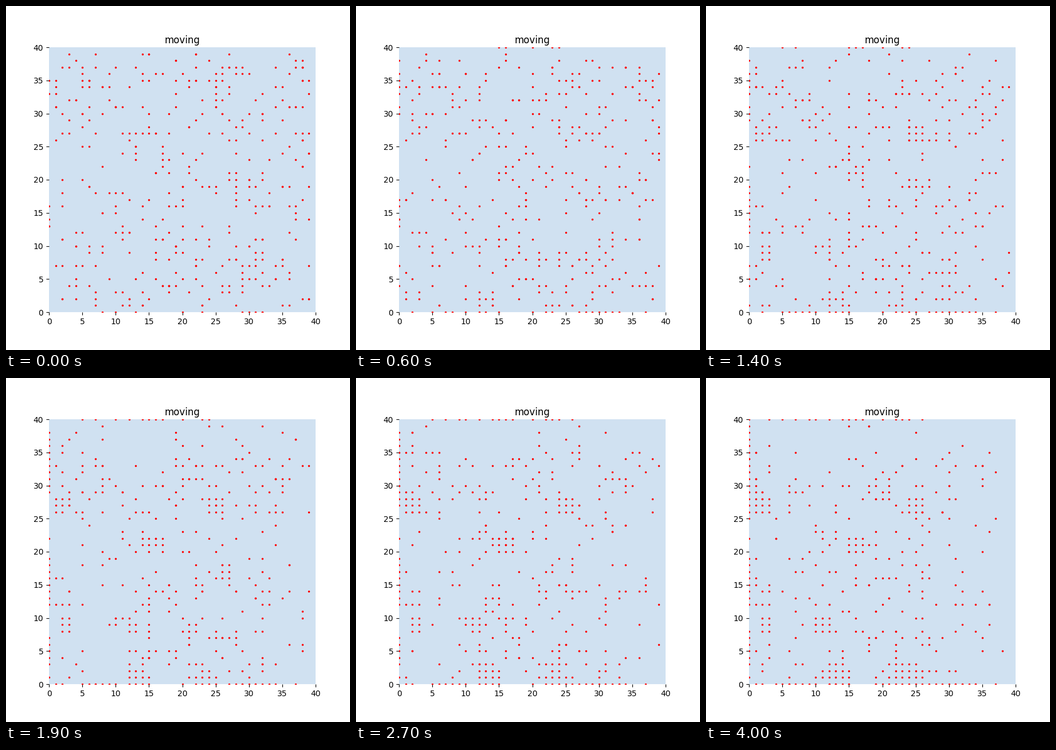
Write a matplotlib script that moves like this. It is 600 px wide and 600 px high and loops after 4100 ms.

```python
import matplotlib.pyplot as plt
import numpy as np
from matplotlib.animation import FuncAnimation

FRAMES = 41
WALKERS = 400
TOP = (39, 40)  # largest x and y a walker can reach
HUBS = np.array([(2, 9), (2, 13), (2, 27), (11, 9), (16, 21),
                 (25, 27), (13, 2), (22, 2)])
rng = np.random.default_rng(12)


def is_haven(x, y, held):
    """A walker settles at a wall, at a hub or in a crowd of settled ones."""
    at_wall = x == 0 or y in (0, TOP[1])
    at_hub = np.abs(HUBS - (x, y)).max(axis=1).min() <= 1
    return at_wall or at_hub or held[x:x + 3, y:y + 3].sum() >= 4


def settle(pos, settled, held):
    for i in np.flatnonzero(~settled):
        x, y = pos[i]
        # held has a margin of one cell on every side
        if not held[x + 1, y + 1] and is_haven(x, y, held):
            held[x + 1, y + 1] = settled[i] = True


def walk():
    pos = rng.integers(0, 40, (WALKERS, 2))
    settled = np.zeros(WALKERS, bool)
    held = np.zeros((TOP[0] + 3, TOP[1] + 3), bool)
    path = [pos]
    for _ in range(FRAMES - 1):
        settle(pos, settled, held)
        # Random steps with a slight drift to the left and down
        step = np.column_stack([
            rng.choice([-1, 0, 1], WALKERS, p=[0.38, 0.40, 0.22]),
            rng.choice([-1, 0, 1], WALKERS, p=[0.35, 0.40, 0.25])])
        step[settled] = 0
        pos = np.clip(pos + step, 0, TOP)
        path.append(pos)
    return path


path = walk()

fig, ax = plt.subplots(figsize=(6, 6), dpi=100)
ax.set_facecolor("#d0e1f1")
ax.spines[:].set_visible(False)
ax.set(xlim=(0, 40), ylim=(0, 40))
ax.set_title("moving", pad=5.3)
ticks = range(0, 41, 5)
ax.set_xticks(ticks)
ax.set_yticks(ticks)
dots, = ax.plot([], [], "r.", markersize=3)


def draw(frame):
    dots.set_data(*path[frame].T)
    return dots,


anim = FuncAnimation(fig, draw, frames=FRAMES, interval=100, repeat=True)
plt.show()
```
